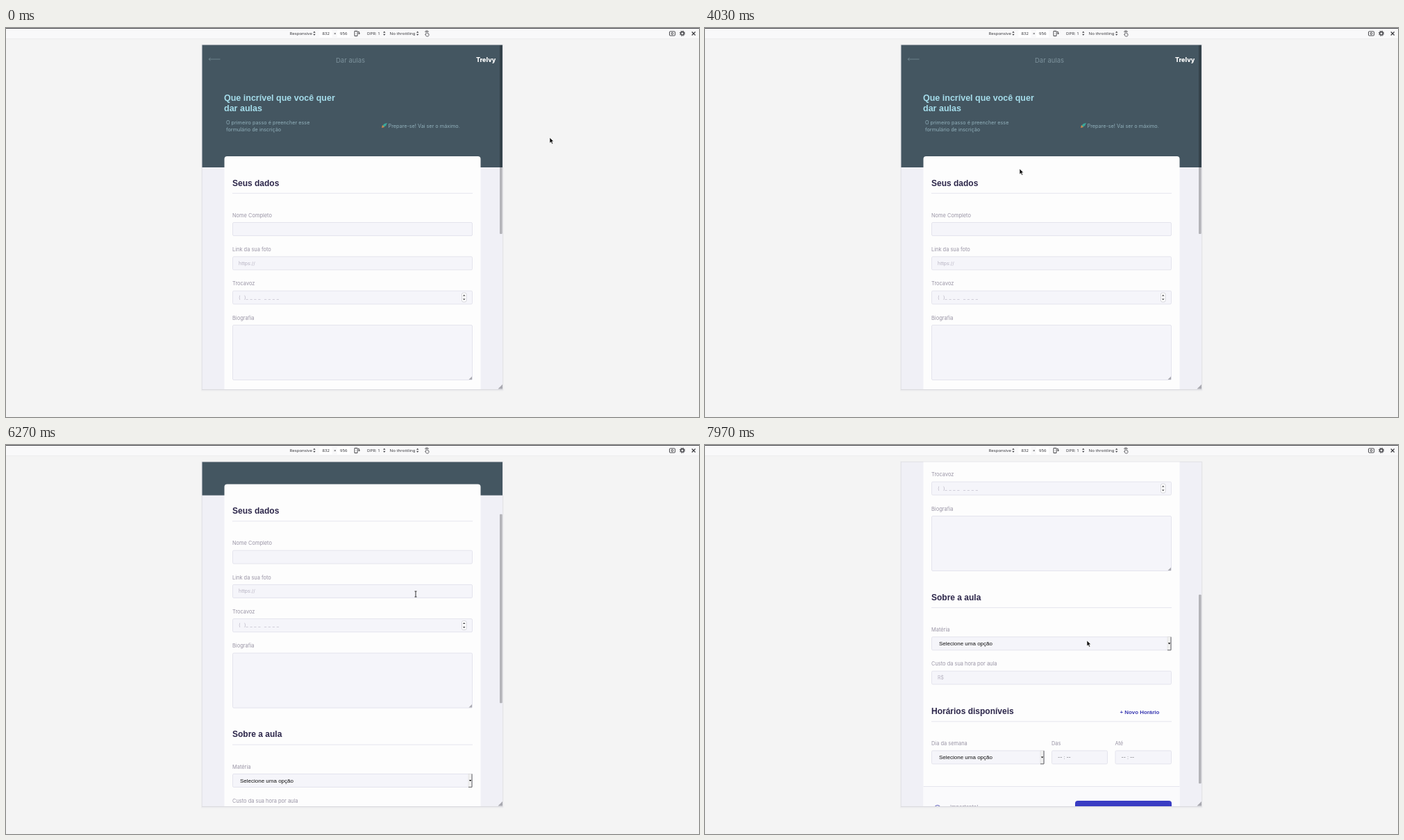
Animation of 998 by 561 pixels, one loop 8000 ms. Source, as an HTML page:

```html
<!DOCTYPE html>
<html lang="pt-BR">
<head>
<meta charset="utf-8">
<title>Dar aulas</title>
<style>
  html, body { margin: 0; width: 100%; height: 100%; overflow: hidden; background: #f4f4f4; }
  svg { display: block; width: 100%; height: 100%; }
  text { font: 7.45px Inter, sans-serif; fill: #9994a5; white-space: pre; }
  .bar { font: 6.1px "Noto Sans", sans-serif; fill: #38383d; }
  .heading { font: bold 12px "Liberation Sans", sans-serif; fill: #2c264a; }
  .hero { font-size: 12.5px; fill: #a5ddeb; }
  .nav { font-size: 9.5px; fill: #7d929c; }
  .sub { font-size: 7.28px; fill: #91b0bb; }
  .brand { font-size: 9px; font-weight: 800; fill: #fff; }
  .hint { font-size: 7px; fill: #b5b1c0; }
  .digits { word-spacing: .75px; }
  .time { font-size: 7px; fill: #66666c; }
  .option { font: 8px "Liberation Sans", sans-serif; fill: #111; }
  .add { font: bold 7.9px "Liberation Sans", sans-serif; fill: #3a3ab2; }
  .field { fill: #f5f5fa; stroke: #e4e4ed; }
  .rule { stroke: #e5e5ee; }
  .icon { fill: none; stroke: #38383d; stroke-width: .9; }
</style>
</head>
<body>
<svg id="stage" viewBox="0 0 998 561" preserveAspectRatio="none"></svg>
<script>
const LOOP = 8000;
const TICK = 32.6, TICK_TIME = 250;
const tickStarts = [5220, 5650, 5860, 6083, 6380, 6500, 6610, 7150, 7350, 7600];
const beamSpans = [[6200, 6560], [6950, 7500]];
const pointerPath = [
  [0, 783, 158], [2250, 783, 158], [2500, 768, 160], [3350, 608, 185], [3950, 453, 203],
  [4250, 453, 203], [4900, 590, 215], [7500, 590, 215], [7900, 550, 282], [LOOP, 550, 282]
];

const text = (x, y, content, cls = '') => `<text x="${x}" y="${y}" class="${cls}">${content}</text>`;
const box = (x, y, w, h, attrs) => `<rect x="${x}" y="${y}" width="${w}" height="${h}" ${attrs}/>`;
const path = (d, attrs) => `<path d="${d}" ${attrs}/>`;
const field = (x, y, w, h = 19) => box(x + .5, y + .5, w - 1, h, 'class="field" rx="1.5"');
const input = (label, y, hint = '', x = 326, w = 346, cls = 'hint') =>
  text(x, y - 7.2, label) + field(x, y, w) + text(x + 9, y + 12.3, hint, cls);
const section = (title, y) => text(326, y, title, 'heading') + path(`M326 ${y + 10.8}H672`, 'class="rule"');
const select = (label, y, w) => input(label, y, '', 326, w) +
  text(337, y + 12.8, 'Selecione uma opção', 'option') +
  box(320 + w, y + .5, 5, 19, 'fill="#f0f0f0" stroke="#d5d5d5" stroke-width=".5"') +
  path(`M${320 + w} ${y + 19.5}h5v-19`, 'fill="none" stroke="#66666a"') +
  path(`M${320.8 + w} ${y + 9}h3.6l-1.8 2.2z`, 'fill="#111"');
const upDown = (x, y, gap = 1) =>
  path(`M${x - 1.7} ${y - gap}l1.7-2 1.7 2zM${x - 1.7} ${y + gap}l1.7 2 1.7-2z`, 'fill="#38383d"');
const grip = (x, y, size) => path(`M${x} ${y}v${-size}l${-size} ${size}z`, 'fill="#a9a9b0"');

const header = box(282, 24, 433, 177, 'fill="#445661"') +
  path('M308.5 45H292m2.5-2L292 45l2.5 2', 'fill="none" stroke="#71868f" stroke-width=".9"') +
  text(475, 49.8, 'Dar aulas', 'nav') +
  text(677, 49.4, 'Trelvy', 'brand') +
  text(314, 105, 'Que incrível que você quer', 'heading hero') +
  text(314, 120, 'dar aulas', 'heading hero') +
  text(317, 138.8, 'O primeiro passo é preencher esse', 'sub') +
  text(317, 149.3, 'formulário de inscrição', 'sub') +
  path('M549 137l-4 1-3 3 2 2 3-2z', 'fill="#3aa79a"') +
  path('M542 140l-1 4 4-1z', 'fill="#d08a4b"') +
  text(550.5, 143.8, 'Prepare-se! Vai ser o máximo.', 'sub');

const form = box(314.5, 185, 369, 720, 'rx="4" fill="#fdfdfd"') +
  section('Seus dados', 227.5) +
  input('Nome Completo', 280) +
  input('Link da sua foto', 329.3, 'https://') +
  input('Trocavoz', 378.6, '(  )_ _ _ _  _ _ _ _', 326, 346, 'hint digits') +
  box(656.5, 382, 6.5, 13, 'rx="2" fill="#fff" stroke="#c9c9cf" stroke-width=".7"') +
  upDown(659.7, 388.5, 2) +
  text(326, 420.7, 'Biografia') + field(326, 428, 346, 79) + grip(671, 507, 4.5) +
  section('Sobre a aula', 549.8) +
  select('Matéria', 602.3, 346) +
  input('Custo da sua hora por aula', 651.6, 'R$') +
  section('Horários disponíveis', 714) +
  text(597.5, 714.3, '+ Novo Horário', 'add') +
  select('Dia da semana', 766.4, 163) +
  input('Das', 766.4, '-- : --', 499, 81, 'time') +
  input('Até', 766.4, '-- : --', 590.5, 81.5, 'time') +
  box(314.5, 818.5, 369, 90, 'fill="#fafafc"') +
  path('M314.5 818.5H683.5', 'class="rule"') +
  '<circle cx="334.8" cy="849.5" r="4" fill="none" stroke="#5a5ab8"/>' +
  text(353, 851, 'Importante!') +
  box(533, 839, 139, 29, 'rx="4" fill="#393cc3"');

const toolbar = box(0, 0, 998, 15, 'fill="#f9f9fa"') +
  box(0, 0, 998, 1, 'fill="#45454a"') + box(0, 15, 998, .5, 'fill="#e4e4e6"') +
  box(451.5, 2.5, 18, 11, 'fill="#fff"') + box(477, 2.5, 18, 11, 'fill="#fff"') +
  text(408.5, 10.2, 'Responsive', 'bar') + upDown(444, 7.8) +
  text(455.5, 10.2, '832', 'bar') + text(472, 10.2, '×', 'bar') + text(481, 10.2, '956', 'bar') +
  path('M502 4.5h4v7h-4zM507 5.5h1.5v3M507.3 7.5l1.2 1.5 1.2-1.5', 'class="icon"') +
  text(520, 10.2, 'DPR: 1', 'bar') + upDown(544.8, 7.8) +
  text(552.5, 10.2, 'No throttling', 'bar') + upDown(592.7, 7.8) +
  path('M605 9V5.5q1-1.5 2 0V8l2 .5v2l-1 1.5h-2.5l-2-3zM603.5 6q0-2 2.5-2t2.5 2', 'class="icon" style="stroke-width:.7"') +
  box(955.5, 5, 8, 6, 'rx="1" class="icon"') + '<circle cx="959.5" cy="8" r="1.4" class="icon"/>' +
  '<circle cx="974" cy="7.8" r="2.3" class="icon" style="stroke-width:1.4"/>' +
  '<circle cx="974" cy="7.8" r="3.7" class="icon" stroke-dasharray="1.45 1.456"/>' +
  path('M987.7 5.5l5 5m0-5l-5 5', 'class="icon" style="stroke-width:1.1"');

stage.innerHTML = `
  <defs><clipPath id="view">${box(282.5, 24.5, 432.5, 496.5, '')}</clipPath></defs>
  ${box(0, 0, 998, 561, 'fill="#f4f4f4"')}
  ${toolbar}
  ${box(281, 23.5, 435.5, 500, 'fill="#ececee"')}
  ${box(282, 24, 433.5, 498, 'fill="#dadade"')}
  <g clip-path="url(#view)">
    ${box(282, 24, 434, 498, 'fill="#f0f0f6"')}
    <g id="page">${header}${form}</g>
    ${box(711, 24.5, 3.7, 272.5, 'id="thumb" rx="1" fill="#000" fill-opacity=".25"')}
  </g>
  ${grip(715, 520.5, 6.5)}
  <g id="pointer">
    ${path('M0 0v8l1.9-1.6 1.4 2.9 1.4-.7-1.4-2.8 2.4-.2z', 'id="arrow" fill="#111" stroke="#fff" stroke-width=".6"')}
    ${path('M-1.5-4h3M0-4v8M-1.5 4h3', 'id="beam" fill="none" stroke="#222" stroke-width=".9"')}
  </g>`;

const [page, thumb, pointer, arrow, beam] =
  ['page', 'thumb', 'pointer', 'arrow', 'beam'].map(id => document.getElementById(id));
const move = (el, x, y) => el.setAttribute('transform', `translate(${x} ${y})`);
const show = (el, visible) => el.setAttribute('visibility', visible ? 'visible' : 'hidden');

function scrollAt(t) {
  return tickStarts.reduce((sum, start) => {
    const p = Math.min(1, Math.max(0, (t - start) / TICK_TIME));
    return sum + TICK * (1 - (1 - p) ** 2);
  }, 0);
}

function pointerAt(t) {
  const i = pointerPath.findIndex(key => key[0] > t);
  const [t0, x0, y0] = pointerPath[i - 1], [t1, x1, y1] = pointerPath[i];
  const p = (t - t0) / (t1 - t0);
  return [x0 + (x1 - x0) * p, y0 + (y1 - y0) * p];
}

function draw(now) {
  const t = now % LOOP, scroll = scrollAt(t);
  move(page, 0, -scroll);
  move(thumb, 0, scroll * .587);
  move(pointer, ...pointerAt(t));
  const overText = beamSpans.some(([from, to]) => t >= from && t < to);
  show(beam, overText);
  show(arrow, !overText);
}

const startTime = performance.now();
function tick() {
  draw(performance.now() - startTime);
  requestAnimationFrame(tick);
}
tick();
</script>
</body>
</html>
```
